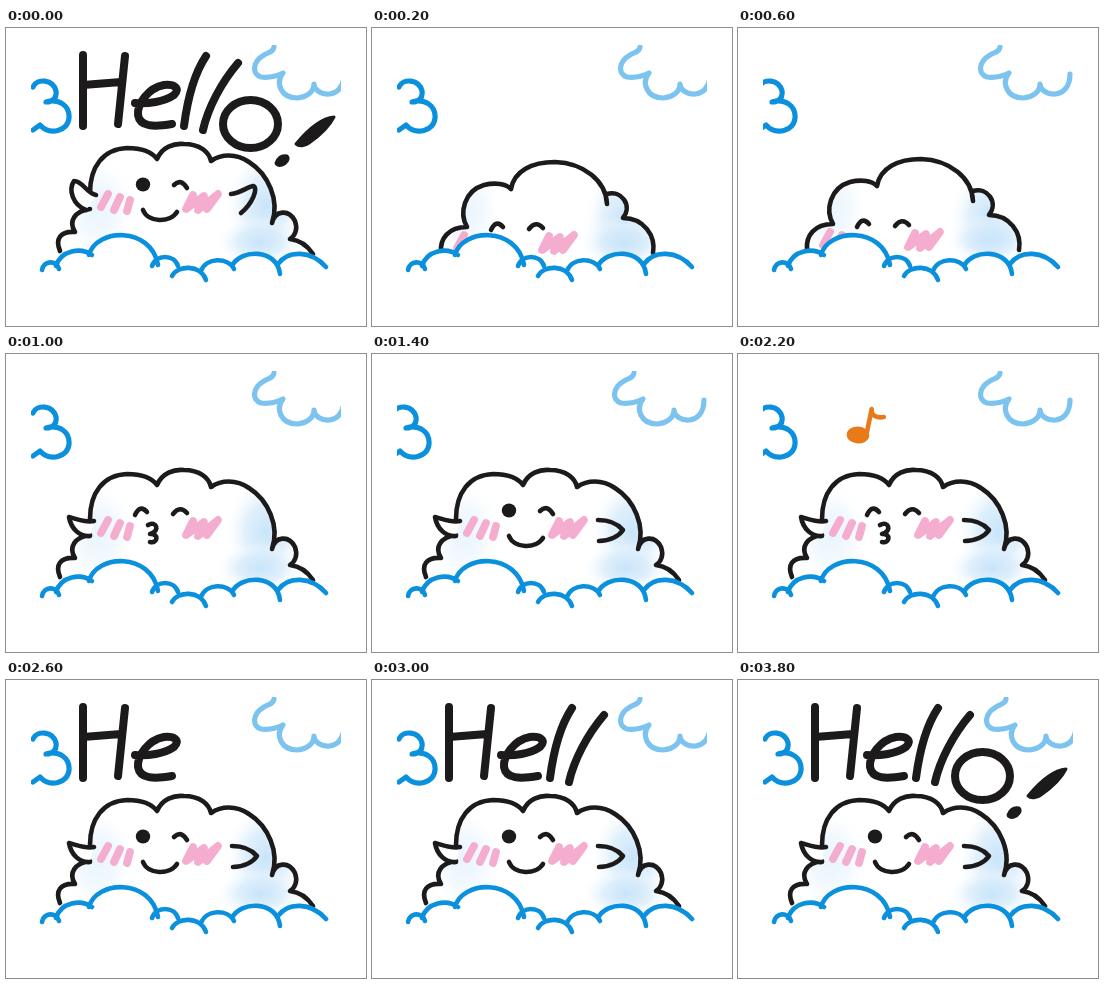
An HTML page for the animation above (4000 ms loop, 360 by 298 pixels).

```html
<!DOCTYPE html>
<html lang="en">
<head>
<meta charset="utf-8">
<title>Hello cloud</title>
<style>
html, body { margin: 0; width: 100%; height: 100%; overflow: hidden; background: #fff; }
svg { display: block; width: 360px; height: 298px; fill: none; stroke-linecap: round; stroke-linejoin: round; }
.ink { stroke: #1c1a1a; stroke-width: 4.6; }
.cheek { stroke: #f4adcf; stroke-width: 7.8; }
.word { stroke: #1c1a1a; stroke-width: 8; }
</style>
</head>
<body>
<svg viewBox="0 0 360 298" role="img" aria-label="Hello!">
  <defs>
    <radialGradient id="shade">
      <stop offset="0" stop-color="#c8e4f9"/>
      <stop offset=".5" stop-color="#d6ebfb" stop-opacity=".75"/>
      <stop offset="1" stop-color="#fff" stop-opacity="0"/>
    </radialGradient>
    <clipPath id="frame"><rect x="25" y="17" width="310" height="250"/></clipPath>
    <clipPath id="inside"><path id="bodyClip"/></clipPath>
  </defs>

  <g clip-path="url(#frame)" stroke-width="5.2">
    <path id="left" stroke="#0b90de" d="M21 59C25 50 41 51 44 63C45 70 41 74 34 74C47 70 58 78 57 90C56 103 38 108 28 97L21 102"/>
    <path id="right" stroke="#7cc4ef" d="M262 19C261 25 256 24 252 27C240 34 240 46 249 49C257 50 265 48 271 45C263 55 269 70 285 70C296 69 302 63 302 56C303 69 332 73 332 46"/>
  </g>

  <g id="cloud">
    <path id="bodyFill" fill="#fff"/>
    <g clip-path="url(#inside)" fill="url(#shade)">
      <ellipse id="shadeRight" rx="42" ry="56"/>
      <ellipse id="shadeLow" rx="46" ry="26"/>
      <ellipse cx="92" cy="180" rx="40" ry="54" opacity=".4"/>
    </g>
    <path id="body" class="ink"/>
    <path id="handL" class="ink" fill="#fff"/>
    <path id="handR" class="ink"/>
    <g id="face">
      <path class="cheek" d="M102 166L95 179M114 169L108 182M124 172L121 183M187 167L180 181L198 168L192 182L212 166L201 181"/>
      <path id="eyesShut" class="ink" d="M129 161Q134 150 141 158M167 160Q174 151 181 159"/>
      <g id="eyesWink">
        <ellipse cx="137" cy="156.5" rx="7.2" ry="7" fill="#1c1a1a"/>
        <path class="ink" d="M168 157Q175 150 181 160"/>
      </g>
      <path id="pucker" class="ink" d="M142 171C150 166 155 177 144 180C153 179 152 190 144 188"/>
      <path id="smile" class="ink" d="M137 182C142 195 164 195 171 184"/>
    </g>
  </g>

  <path id="frontFill" fill="#fff"/>
  <path id="front" stroke="#0b90de" stroke-width="4.6"/>

  <g id="note" stroke-width="4.6">
    <ellipse rx="9" ry="6.2" transform="rotate(-15)"/>
    <path fill="none" d="M8 -2L5 -29C6 -22 13 -22 19 -25"/>
  </g>

  <g id="word" class="word">
    <path d="M77 27L77 98M119 28L112 96M77 57L115 54"/>
    <path d="M129 75C142 76 158 74 168 67C175 60 168 56 158 57C142 60 131 76 132 87C134 99 148 99 166 96"/>
    <path d="M200 28Q184 52 178 98"/>
    <path d="M232 35C215 55 202 80 197 102"/>
    <ellipse cx="244.5" cy="96" rx="27.5" ry="24"/>
    <path fill="#1c1a1a" stroke-width="3" d="M328 89C317 90 304 99 290 116C293 119 299 118 303 115C313 108 323 99 328 89ZM270 135C272 130 276 127 281 128C284 131 280 136 276 137C273 138 270 137 270 135Z"/>
  </g>
</svg>
<script>
const $ = id => document.getElementById(id);
const set = (id, name, value) => $(id).setAttribute(name, value);
const show = (id, on) => $(id).style.display = on ? "" : "none";

const tall = {
  line: "M54 223C49 211 54 203 69 204C62 193 69 183 84 181M84 165C84 139 97 121 121 120C136 120 146 124 151 131C156 119 168 115 178 116C194 116 203 124 205 133C215 126 230 125 243 134C262 146 274 172 266 195C269 182 283 181 289 193C292 201 289 208 284 211C293 212 301 217 307 226",
  fill: "M54 223C49 211 54 203 69 204C62 193 69 183 84 181L84 165C84 139 97 121 121 120C136 120 146 124 151 131C156 119 168 115 178 116C194 116 203 124 205 133C215 126 230 125 243 134C262 146 274 172 266 195C269 182 283 181 289 193C292 201 289 208 284 211C293 212 301 217 307 226V240H54Z",
  right: "translate(260 178)", low: "translate(254 214)"
};
const low = {
  line: "M69 221C68 208 76 196 95 196C87 182 92 160 112 154C124 151 134 153 139 158C142 140 160 131 183 131C212 132 234 150 235 173M235 163C249 159 261 174 251 187C272 187 284 205 281 222",
  fill: "M69 221C68 208 76 196 95 196C87 182 92 160 112 154C124 151 134 153 139 158C142 140 160 131 183 131C212 132 230 147 235 163C249 159 261 174 251 187C272 187 284 205 281 222V240H69Z",
  right: "translate(252 190)", low: "translate(252 212)"
};
const hands = {
  up: ["M90 167C80 165 77 153 68 153C62 162 67 177 80 182", "M225 166C235 165 241 159 247 158C253 160 246 176 235 185"],
  down: ["M88 167C80 169 71 165 63 163C65 175 74 183 84 182", "M226 166C236 166 245 169 251 176C247 182 238 187 227 187"]
};

const lobes = "M36 242C38 232 50 232 53 241M50 238C55 222 75 219 86 227M83 227C90 200 145 198 152 237M146 238C150 226 168 226 172 238M166 248C171 237 195 236 200 252M195 243C200 229 222 229 228 241M226 238C234 221 271 220 274 246M272 236C282 222 305 222 320 239";
set("front", "d", lobes);
set("frontFill", "d", lobes.replace(/M/g, "L").replace("L", "M") + "V262H36Z");

const notes = {
  9: [47, 150, 0, "#e0187c"],
  10: [82, 114, 9, "#e0187c"],
  11: [120, 81, 18, "#e87a1a"]
};
const sink = { 1: 3, 2: 9, 4: 4 };

function draw(step) {
  const ducked = step >= 1 && step <= 3;
  const pose = ducked ? low : tall;
  set("cloud", "transform", `translate(0 ${sink[step] || 0})`);
  set("body", "d", pose.line);
  set("bodyFill", "d", pose.fill);
  set("bodyClip", "d", pose.fill);
  set("shadeRight", "transform", pose.right);
  set("shadeLow", "transform", pose.low);
  set("face", "transform", ducked ? "translate(-10 38)" : "");

  const arms = hands[step % 2 || step === 4 ? "down" : "up"];
  set("handL", "d", arms[0]);
  set("handR", "d", arms[1]);
  show("handL", !ducked);
  show("handR", step === 0 || step >= 6);

  const happy = step === 0 || step === 7 || step === 8 || step >= 13;
  show("eyesWink", happy);
  show("smile", happy);
  show("eyesShut", !happy);
  show("pucker", !happy && !ducked);

  // The side clouds sway, then rest while the word is complete
  const resting = step === 0 || step >= 15;
  const shift = resting ? 6 : 3 + 3 * Math.sin(step * Math.PI / 2);
  set("left", "transform", `translate(${shift} 0)`);
  set("right", "transform", `translate(${shift} 0)`);

  const note = notes[step];
  show("note", note);
  if (note) {
    const [x, y, turn, color] = note;
    set("note", "transform", `translate(${x} ${y}) rotate(${turn})`);
    set("note", "fill", color);
    set("note", "stroke", color);
  }

  // One letter per step
  const count = step === 0 ? 6 : step - 11;
  [...$("word").children].forEach((letter, i) => letter.style.display = i < count ? "" : "none");
}

let last = -1;
function tick() {
  const step = Math.floor(performance.now() % 4000 / 200);
  if (step !== last) draw(last = step);
  requestAnimationFrame(tick);
}
tick();
</script>
</body>
</html>
```
